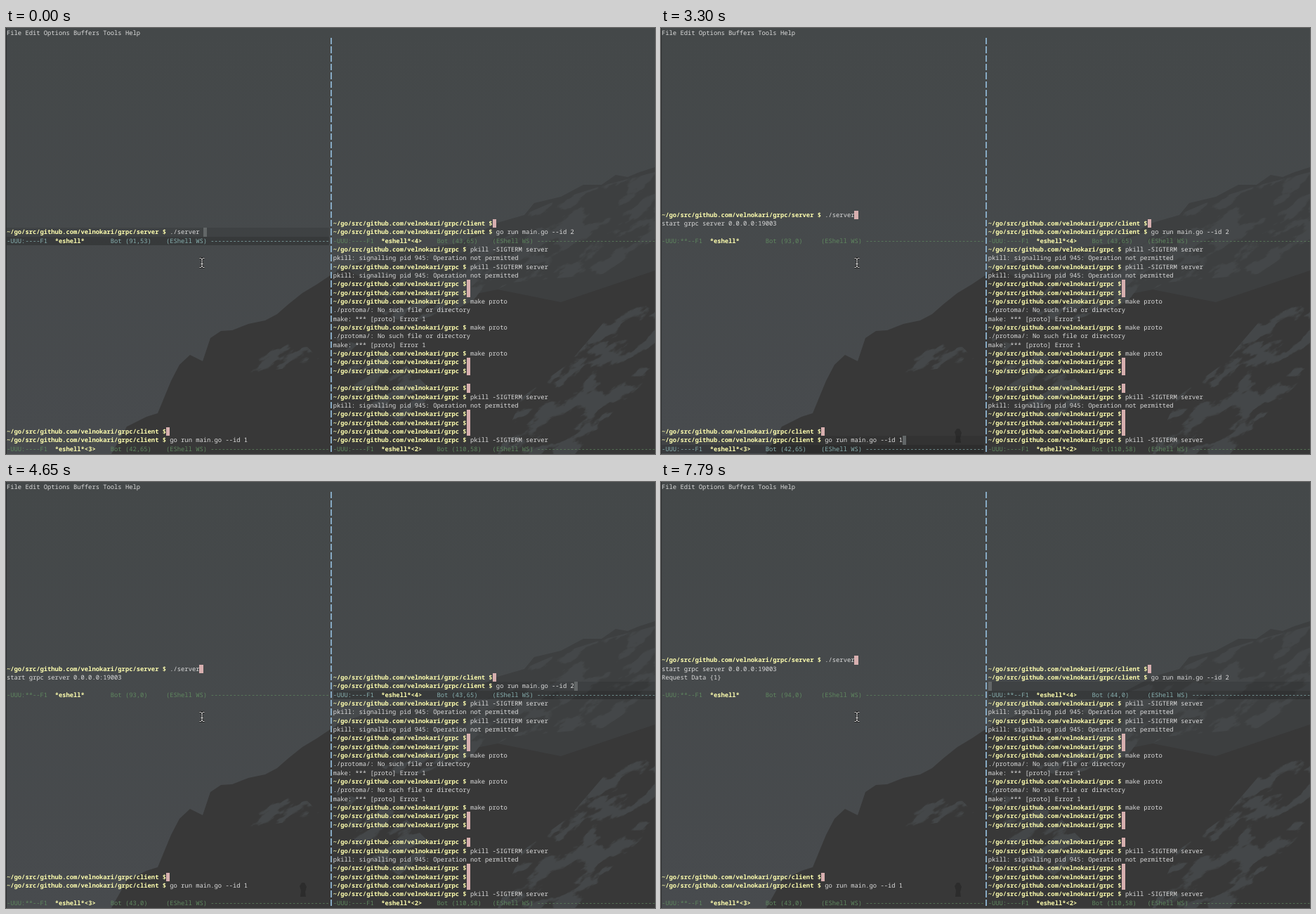
Animation, 924 px wide and 606 px high, one loop 8000 ms. Source, as an HTML page:

```html
<!DOCTYPE html>
<html lang="en">
<head>
<meta charset="utf-8">
<title>Terminal panes</title>
<style>
  html, body { margin: 0; width: 100%; height: 100%; overflow: hidden; background: #45494b; }
  #stage { position: relative; width: 924px; height: 606px; overflow: hidden;
    font: 8.8px/12.333px "Noto Sans Mono", "DejaVu Sans Mono", monospace;
    text-rendering: geometricPrecision; font-variant-ligatures: none; color: #dcdcdc; }
  #stage > svg { position: absolute; inset: 0; }
  .row, .block { position: absolute; height: 12.333px; white-space: pre; }
  b { color: #ffffaf; font-weight: bold; }
  .trail { display: inline-block; height: 12.333px; vertical-align: top; background: #d7afaf; }
  .mode { color: #5f875f; }
  .mode.active { color: #87afaf; }
  .current { background: rgba(20, 20, 20, .13); }
  .bar { background: rgba(20, 20, 20, .3); }
  .cursor { background: #626667; }
  #divider { position: absolute; left: 462.3px; top: 14px; width: 1.5px; height: 591px;
    background: repeating-linear-gradient(#87a9c3 0 9.3px, transparent 9.3px 12.333px); }
</style>
</head>
<body>
<div id="stage">
  <svg width="924" height="606">
    <defs>
      <linearGradient id="sky" x2="0" y2="1">
        <stop stop-color="#444849"/><stop offset="1" stop-color="#484b4e"/>
      </linearGradient>
      <filter id="snow" x="0" y="0" width="1" height="1" color-interpolation-filters="sRGB">
        <feTurbulence type="fractalNoise" baseFrequency=".018 .05" numOctaves="5" seed="7"/>
        <feColorMatrix values="0 0 0 0 .268  0 0 0 0 .28  0 0 0 0 .286  14 0 0 0 -7.1"/>
      </filter>
      <clipPath id="slopes">
        <path d="M600 322L690 290 745 262 790 243 850 224 924 205V300L850 350 720 362 640 400 570 420 520 400Z"/>
        <path d="M924 385L850 420 800 478 735 525 700 606H810L870 540 924 490Z"/>
        <path d="M395 443L425 450 446 470 400 484 352 490 325 486 360 470Z"/>
        <path d="M470 440L560 470 610 520 560 560 500 520Z"/>
      </clipPath>
    </defs>
    <rect width="924" height="606" fill="url(#sky)"/>
    <path fill="#3d3f40" d="M470 345L545 318 600 312 645 306 700 277 738 266 752 249 790 240 822 223 848 223 868 209 885 212 902 205 924 198V606H470Z"/>
    <path fill="#383838" d="M150 606L172 567 200 553 216 548 235 502 247 479 262 465 270 469 280 474 291 441 306 431 322 430 345 421 369 416 386 407 402 393 422 377 442 365 463 351 482 341 510 358 560 352 610 390 700 372 790 390 924 345V606Z"/>
    <g clip-path="url(#slopes)">
      <rect x="150" y="100" width="900" height="700" filter="url(#snow)" transform="rotate(-32 600 450)"/>
    </g>
    <path id="figure" fill="#2c2c2c" d="M419 590L420 581 418 575 421 570 425 570 428 576 426 583 427 590Z"/>
    <path fill="#2b2d2e" d="M0 0H1V606H0Z"/>
  </svg>
  <div id="divider"></div>
  <div class="row" style="left:1px;top:.8px">File Edit Options Buffers Tools Help</div>
  <div id="panes"></div>
  <svg width="924" height="606" fill="none">
    <path id="beam" d="M275.5 327.5H277.5L279 329 280.5 327.5H282.5M279 329V339M275.5 340.5H277.5L279 339 280.5 340.5H282.5M277.5 335.5H280.5" stroke="#222" stroke-width="2.6"/>
    <use href="#beam"/>
    <path d="M275.5 327.5H277.5L279 329 280.5 327.5H282.5M279 329V339M275.5 340.5H277.5L279 339 280.5 340.5H282.5M277.5 335.5H280.5" stroke="#e4e4e4"/>
  </svg>
</div>
<script>
const LOOP = 8000, CELL_W = 5.28, CELL_H = 37 / 3, LEFT = 1, TOP = 0.8, PANE_COLS = 87;

const prompt = (dir, command = '') => `~/go/src/github.com/velnokari/grpc${dir} $ ${command}`;
const kill = prompt('', 'pkill -SIGTERM server');
const denied = 'pkill: signalling pid 945: Operation not permitted';
const make = prompt('', 'make proto');
const failed = [make, './protoma/: No such file or directory', 'make: *** [proto] Error 1'];
const idle = prompt('');

const client = id => [prompt('/client'), prompt('/client', `go run main.go --id ${id}`)];
const launched = prompt('/server', './server ');
const greeting = 'start grpc server 0.0.0.0:19003';

// Each view is [cursor line number, visible lines]; the cursor ends the last line.
const panes = {
  server: { col: 0, modeRow: 24, name: '*eshell*', views: [
    [91, [launched]],
    [93, [launched, greeting, '']],
    [94, [launched, greeting, 'Request Data {1}', '']]] },
  first: { col: 0, modeRow: 48, name: '*eshell*<3>', views: [
    [42, client(1)], [43, [...client(1), '']]] },
  second: { col: 88, modeRow: 24, name: '*eshell*<4>', views: [
    [43, client(2)], [44, [...client(2), '']]] },
  log: { col: 88, modeRow: 48, name: '*eshell*<2>', views: [
    [110, [kill, denied, kill, denied, idle, idle, ...failed, ...failed, make, idle, idle, '',
      idle, kill, denied, idle, idle, idle, kill]]] },
};

const steps = [
  { at: 0, focus: 'server', server: 0, first: 0, second: 0 },
  { at: 450, focus: 'server', server: 1, first: 0, second: 0 },
  { at: 3300, focus: 'first', server: 1, first: 0, second: 0 },
  { at: 4050, focus: 'first', server: 1, first: 1, second: 0 },
  { at: 4650, focus: 'second', server: 1, first: 1, second: 0 },
  { at: 7640, focus: 'second', server: 1, first: 1, second: 1 },
  { at: 7790, focus: 'second', server: 2, first: 1, second: 1 },
];

const escapeHtml = s => s.replace(/&/g, '&amp;').replace(/</g, '&lt;');

function place(className, col, row, content = '', cols = 0) {
  const width = cols ? `;width:${cols * CELL_W}px` : '';
  return `<div class="${className}" style="left:${LEFT + col * CELL_W}px;top:${TOP + row * CELL_H}px${width}">${content}</div>`;
}

function lineHtml(line, isLast) {
  const [, path, text, trail] = line.match(/^(~.* \$)?(.*?)( ?)$/);
  const end = trail && !isLast ? '<span class="trail"> </span>' : trail;
  return (path ? `<b>${path}</b>` : '') + escapeHtml(text) + end;
}

function paneHtml({ col, modeRow, name, views }, view, active) {
  const [lineNo, lines] = views[view];
  const last = lines[lines.length - 1];
  const firstRow = modeRow - lines.length;
  const flag = last ? '--' : '**';
  const position = `Bot (${lineNo},${last.length})`.padEnd(15);
  const mode = `-UUU:${flag}--F1  <b>${escapeHtml(name)}</b>${' '.repeat(15 - name.length)}` +
    `${position}(EShell WS) ${'-'.repeat(PANE_COLS - 55)}`;
  const highlight = !active ? '' :
    place('block current', col, modeRow - 1, '', PANE_COLS) +
    place('block bar', col, modeRow, '', PANE_COLS) +
    place('block cursor', col + last.length, modeRow - 1, '', 1);
  return highlight +
    lines.map((line, i) => place('row', col, firstRow + i, lineHtml(line, i === lines.length - 1))).join('') +
    place(active ? 'row mode active' : 'row mode', col, modeRow, mode);
}

const screen = document.getElementById('panes');
const figure = document.getElementById('figure');
let shown;

function draw() {
  const time = performance.now() % LOOP;
  const step = steps.findLast(s => s.at <= time);
  if (step !== shown) {
    shown = step;
    screen.innerHTML = Object.entries(panes)
      .map(([key, pane]) => paneHtml(pane, step[key] ?? 0, key === step.focus)).join('');
    figure.style.visibility = step.at >= 3300 ? 'visible' : 'hidden';
  }
  requestAnimationFrame(draw);
}
draw();
</script>
</body>
</html>
```
